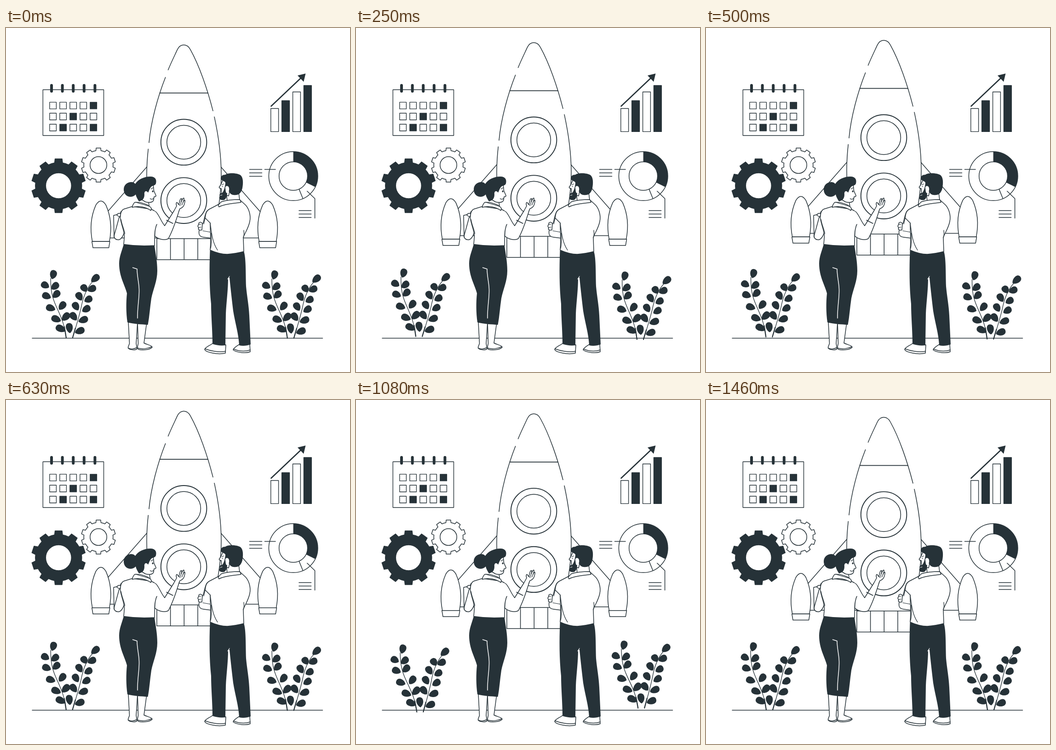
An HTML page with a canvas that plays this animation: 748 px wide and 748 px high, repeating every 1.5 s.

```html
<!DOCTYPE html>
<html lang="en">
<head>
<meta charset="utf-8">
<title>Rocket launch planning</title>
<style>
html, body { margin: 0; width: 100%; height: 100%; overflow: hidden; background: #fff; }
canvas { display: block; width: 100vw; height: 100vh; }
</style>
</head>
<body>
<canvas id="stage" width="748" height="748"></canvas>
<script>
const ctx = document.getElementById('stage').getContext('2d');
const INK = '#263238', WHITE = '#fff';
const LOOP = 1500, STEPS = 36;

function line(d, width = 1.5, color = INK) {
  ctx.lineWidth = width;
  ctx.strokeStyle = color;
  ctx.stroke(new Path2D(d));
}

function solid(d, color = INK) {
  ctx.fillStyle = color;
  ctx.fill(new Path2D(d));
}

function outlined(d, width) {
  solid(d, WHITE);
  line(d, width);
}

function box(x, y, w, h, filled) {
  ctx.fillStyle = filled ? INK : WHITE;
  ctx.strokeStyle = INK;
  ctx.lineWidth = 1.4;
  ctx.fillRect(x, y, w, h);
  ctx.strokeRect(x, y, w, h);
}

function circle(x, y, r, width = 1.5, fill = WHITE) {
  ctx.beginPath();
  ctx.arc(x, y, r, 0, 7);
  ctx.fillStyle = fill;
  ctx.fill();
  if (!width) return;
  ctx.lineWidth = width;
  ctx.strokeStyle = INK;
  ctx.stroke();
}

function calendar() {
  box(80.3, 134.2, 132.2, 99.6);
  for (let i = 0; i < 5; i++) {
    const x = 99 + i * 23.6;
    line(`M${x} 124.8V137.4`, 6);
  }
  const marked = ['4,0', '2,1', '1,2', '4,2'];
  for (let row = 0; row < 3; row++)
    for (let col = 0; col < 5; col++)
      box(94.9 + col * 22, 161.4 + row * 23.9, 14.5, 14.5, marked.includes(col + ',' + row));
}

function barChart() {
  [175, 158, 139, 125].forEach((top, i) => box(575.8 + i * 23.9, top, 16.8, 225.4 - top, i % 2));
  line('M576.5 170L643 107', 2.6);
  solid('M651.5 99L634 103.2L647.2 117Z');
}

function donut() {
  const x = 624.7, y = 322;
  circle(x, y, 53.3);
  ctx.beginPath();
  ctx.moveTo(x, y);
  ctx.arc(x, y, 53.3, -Math.PI / 2, 0.46);
  ctx.fillStyle = INK;
  ctx.fill();
  circle(x, y, 31);
  line('M637.2 350.4L645.5 370.8M654.8 354.8L671.6 371V413.4');
  line('M562.5 307.6H586');
  for (let i = 0; i < 3; i++) {
    line(`M529.5 ${307.6 + i * 7.5}h27`);
    line(`M637 ${397 + i * 7.5}h26.7`);
  }
}

function gear(x, y, outer, body, hole, fill) {
  const teeth = 10;
  const point = (r, a) => ctx.lineTo(x + r * Math.cos(a), y + r * Math.sin(a));
  ctx.beginPath();
  for (let i = 0; i < teeth; i++) {
    const a = -Math.PI / 2 + i * 2 * Math.PI / teeth;
    point(body, a - 0.175);
    point(outer, a - 0.13);
    point(outer, a + 0.13);
    point(body, a + 0.175);
    ctx.arc(x, y, body, a + 0.175, a + 2 * Math.PI / teeth - 0.175);
  }
  ctx.closePath();
  ctx.fillStyle = fill;
  ctx.fill();
  ctx.strokeStyle = INK;
  ctx.lineWidth = 1.5;
  ctx.stroke();
  circle(x, y, hole);
}

function booster(x) {
  ctx.save();
  ctx.translate(x, 0);
  outlined('M-18.5 465.2C-24 438 -22 411 -11 386C-4 374 4 374 11 386C22 411 24 438 18.5 465.2Z');
  outlined('M-19.5 465.2H19.5L17.2 478.6H-17.2Z');
  ctx.restore();
}

function rocket(lift) {
  ctx.save();
  ctx.translate(0, -lift);
  line('M306 303L221 400M467.5 303L553.5 401M226 457.3H330M445 457.3H549');
  booster(206.3);
  booster(569);
  line('M352.5 92C359 76 367 60 372.5 48C379 34 394 34 401 48C420 82 438 134 450 181');
  line('M346.7 108C330 150 315 205 311 250M309.3 264C307 285 306 300 306 320C306 365 314 420 328 458');
  line('M453 194C463 240 468 280 468 320C468 365 459 420 446 458');
  line('M334.5 142.3H439', 1.8);
  for (const y of [249.2, 376]) {
    circle(386.6, y, 49.8, 1.9);
    circle(386.6, y, 36.8);
  }
  line('M328 458.8H446V504.6H328ZM357.6 458.8V504.6M387.3 458.8V504.6M417 458.8V504.6');
  ctx.restore();
}

// Each leaf: centre x, centre y, direction in degrees, length
const LEAVES = [
  [103, 537, -72, 20], [85.5, 559.5, -148, 19], [106.5, 562.5, -38, 20],
  [88.5, 583, -155, 20], [109.5, 580, -42, 20], [97.5, 609, -158, 21],
  [122.5, 605, -50, 21], [109.5, 633, -155, 22], [130, 629, -42, 22],
  [119.5, 654, -152, 23], [138.5, 653, -95, 22], [194, 545.5, -38, 22],
  [170.5, 566, -122, 18], [186.5, 568, -20, 20], [160, 584, -118, 20],
  [179, 591, -25, 19], [152.5, 605.5, -118, 20], [174.5, 612, -28, 20],
  [147.5, 627.5, -125, 21], [168, 635.5, -18, 22], [160.5, 659.5, -18, 22]
];

function plant() {
  line('M131 674C127 640 116 622 108 603C100 585 97 570 97 545', 1.3);
  line('M145 674C153 648 158 631 163 610C168 583 176 564 190 550', 1.3);
  line('M131 674L127 650M145 674L151 653', 2.2);
  for (const [x, y, angle, length] of LEAVES) {
    ctx.save();
    ctx.translate(x, y);
    ctx.rotate(angle * Math.PI / 180);
    ctx.scale(length / 20, 1);
    solid('M-10 0C-6 -9 10 -12 10 -1C10 10 -5 9 -10 0Z');
    ctx.restore();
  }
}

function plants(degrees) {
  ctx.save();
  ctx.translate(381, 600);
  ctx.rotate(degrees * Math.PI / 180);
  ctx.translate(-381, -600);
  plant();
  ctx.translate(481, 0);
  plant();
  ctx.restore();
}

function woman() {
  // Tablet and left arm
  outlined('M234 407.5L249 404L250 452L235 455Z');
  outlined('M250 399C246 410 243 424 236 448C233 457 239 462 247 460C254 456 258 445 259 434Z');
  outlined('M241 407C243 402 248 402 250 405L247 411Z');
  // Legs and shoes
  outlined('M266 640L268.5 686L265.5 694C265 700 282 702 285 697L283 686L286 640Z');
  outlined('M286 640L287.5 686C286 692 285 698 288 699C297 701 313 700 318 694C316 689 307 689 300 685L306 640Z');
  line('M265.5 696C272 699 279 698 284 695M286 696C297 699 309 697 317 693');
  // Trousers
  solid('M256 470L323 473C325 490 329 507 329 528C329 550 320 568 316 588C313 608 312 627 308.5 645.5C294 644 278 644 264 640C261 619 261 596 263 577C259 560 246 541 246 512C246 497 252 485 256 470Z');
  line('M275.5 521L285 524C285 542 290 556 289.5 573C289 594 285.5 610 286 631', 1.5, WHITE);
  // Shirt
  outlined('M275 388L257 393.5C250 396 249 404 248.5 412C250 427 257 440 257.5 452L256 470.5C279 474 302 474.5 323 473L323.5 438L331 414C332 405 327 399 316 394Z');
  // Right arm and hand
  solid('M322 398L327 400L345 429L365 398L377 396C369 421 361 446 353 458C343 462 329 459 323 452Z', WHITE);
  line('M325 399C332 404 336 419 345 430L365 398M323.5 452C330 459 345 463 353 458C359 447 369 422 377 395M328 427C325 432 324 440 323.5 452M349 418L363 425');
  outlined('M364.5 399L371 387C369 381 371 376 374 382L376 384C377 378 378 372 380.5 371C383 370 382 375 381 378C383 373 385 369 387 370C388 372 386 376 385 379C387 374 390 373 389 377C388 385 386 390 378 393L376 398');
  line('M376 384L379 386M381 377L379.5 384M385 379L382.5 385', 1.2);
  // Head
  solid('M286 366L288 382C297 388 306 387 311 385L304 378Z', WHITE);
  outlined('M303 378C309 380 317 380 320 376C322 373 321 370 322 367C326 367 327 365 325.5 363L321.5 354L320 339L298 340L293 372Z');
  solid('M256 351C256 335 276 331 281 339C287 329 301 323 314 323C325 323 328 330 326 338C325 343 318 342 315 346C312 350 311 354 309 358C305 352 300 355 301 362C301 371 297 375 289 377C286 372 283 367 282 362C274 371 256 368 256 351Z');
  solid('M302 360C304 354 309 357 308 362C307 368 303 371 301 369Z', WHITE);
  line('M315.5 350L319.5 347.5', 1.3);
  solid('M317.5 354C319 352 321 354 320.5 356.5C319 358 317 357 317.5 354Z');
  line('M313.5 371C316 373 319 372.5 321 370.5', 1.3);
  // Collar
  outlined('M280 379C277 382 275 386 274.5 390C288 386 304 389 315 397L316 392C311 384 294 378 280 379Z');
  line('M283 379C293 383 303 384 312 388', 1.2);
  line('M250 416C252 428 257 438 258.5 447', 1.2);
}

function man() {
  // Shoes
  outlined('M449 686C443 691 434 693 432 699C434 705 460 711 477 707L478 689Z');
  line('M432.5 697.5C444 702 462 706 477.5 703');
  outlined('M507 688C502 692 495 695 494 700C502 706 521 708 531 704L530 687Z');
  line('M494.5 698C507 703 520 704 531 700');
  // Trousers
  solid('M443.5 484L517 485C522 500 521 530 522 562C524 584 528 603 529 625L532 688C524 691 515 692 507 690C506 666 498 640 494 615C491 590 488 563 486 543L483 543C483 570 479 597 478 622L477 690C467 691 458 690 449 687C449 658 446 627 446 600C442 562 442 523 443.5 484Z');
  line('M482 546L486 540', 1.2, WHITE);
  // Left arm
  outlined('M438 397C433 401 432 413 429 423L420 440C418 450 422 454 430 455L446 457L450 410Z');
  outlined('M427 425C423 420 418 423 419.5 427C416 429 417 433 419 434C417 438 420 441 426 439Z');
  line('M419.5 427L424 427M419 434L424 433M428 441L445 444', 1.2);
  // Shirt
  outlined('M465 382L442 394C435 398 434 405 433 413L444 424C444 442 446 459 444 483C455 488 468 492 481 492C494 491 506 489 517 486L516 455C521 443 527 435 530 421C533 407 528 393 521 385L510 375Z');
  line('M444 424C447 447 449 467 460 483M446 446C447 460 447 470 445 479M516 456C518 452 518 447 517 440M433 413L430 426', 1.3);
  // Head
  outlined('M479 355L481 377L508 374L506 358Z');
  outlined('M473 329C470 333 469 337 467 341L463.5 346C463 348 466 349 468 349L469 361L484 365L491 335Z');
  solid('M467 329C466 322 471 319 477 319C483 314 503 315 510 320C516 325 516 337 514 348C512 357 507 363 500 363C492 364 487 361 485 355L481 358C481 367 477 376 470 374C464 374 462 369 465 366C463 362 466 358 470 359C474 354 476 346 477 338C478 333 471 333 467 329Z');
  solid('M477 349C476 342 484 342 485 348C486 353 484 358 480 359C477 357 478 353 477 349Z', WHITE);
  line('M466 364L470 363', 1, WHITE);
  line('M470 341L473 339', 1.3);
  circle(470.5, 344.5, 1, 0, INK);
  // Collar
  outlined('M468 378L461.5 385L463 389C479 381 497 382 511 379L508.5 373C493 373 480 374 468 378Z');
}

function swayAt(p) {
  if (p < 0.25) return p * 4;
  return p < 0.75 ? 2 - p * 4 : p * 4 - 4;
}

function draw(p) {
  ctx.fillStyle = WHITE;
  ctx.fillRect(0, 0, 748, 748);
  ctx.lineCap = ctx.lineJoin = 'round';
  calendar();
  barChart();
  donut();
  gear(114.3, 343, 59, 50.5, 28, INK);
  gear(201, 298, 37.4, 31.8, 18.2, WHITE);
  line('M57 674.6H688.5');
  plants(swayAt(p));
  rocket(15 * (1 - Math.abs(1 - 2 * p)));
  woman();
  man();
}

// The motion advances 24 times per second
function tick() {
  const time = performance.now() % LOOP;
  const step = Math.floor((time + 5.5) / (LOOP / STEPS)) % STEPS;
  draw((step + 1) / STEPS);
  requestAnimationFrame(tick);
}
tick();
</script>
</body>
</html>
```
